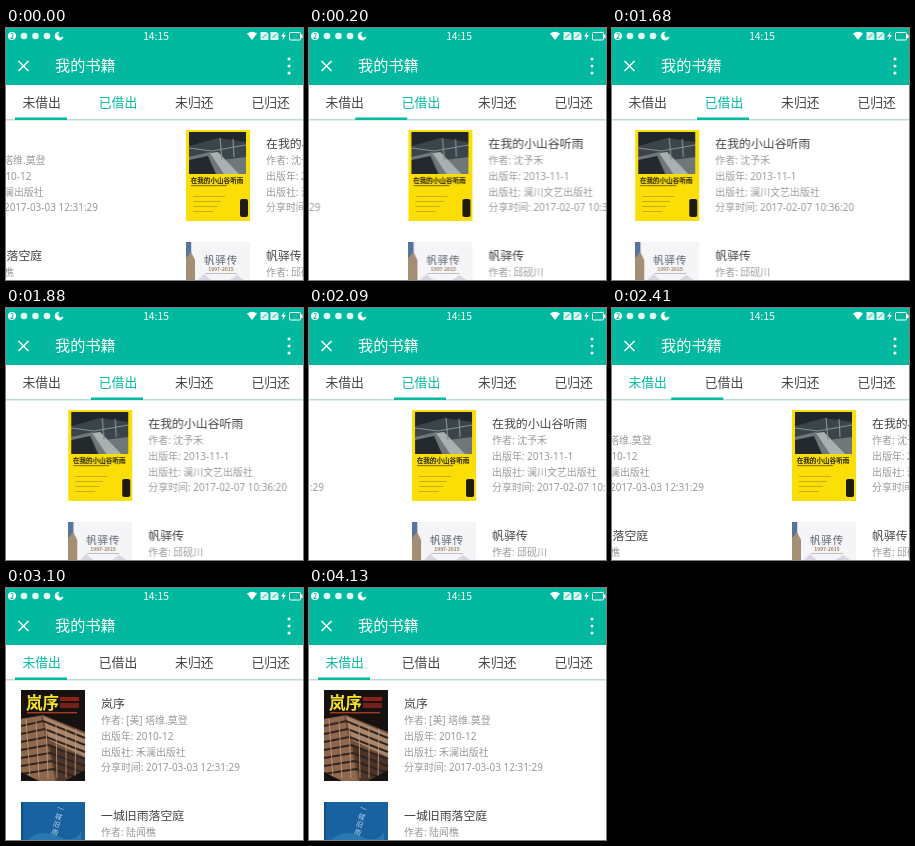
These frames come from a looping animation (297x252 px, 4290 ms). An HTML page:

```html
<!DOCTYPE html>
<html lang="zh-CN">
<head>
<meta charset="utf-8">
<title>我的书籍</title>
<style>
  html, body { margin: 0; width: 100%; height: 100%; overflow: hidden; background: #fff; }
  svg { display: block; width: 297px; height: 252px; }
  text { font-family: "Noto Sans CJK SC", "Noto Sans CJK", "Noto Sans", sans-serif; white-space: pre; }
  .mid { text-anchor: middle; }
  .tab { font-size: 12.8px; fill: #444; }
  .name { font-size: 11.9px; fill: #444; }
  .info { font: 9.95px "Noto Sans", "Noto Sans CJK SC", "Noto Sans CJK", sans-serif; fill: #999; }
</style>
</head>
<body>
<svg id="stage" viewBox="0 0 297 252"></svg>
<script>
const LOOP = 4290, PITCH = 307, FIRST = 32, SELECT = 2270;
const TEAL = '#02b99f', DARK = '#444';
const SETTLE = 'cubic-bezier(.35,0,.25,1)';

const rect = (x, y, w, h, fill, more = '') =>
  `<rect x="${x}" y="${y}" width="${w}" height="${h}" fill="${fill}" ${more}/>`;
const dot = (x, y, r, fill) => `<circle cx="${x}" cy="${y}" r="${r}" fill="${fill}"/>`;
const path = (d, fill, stroke = 'none', width = 1) =>
  `<path d="${d}" fill="${fill}" stroke="${stroke}" stroke-width="${width}"/>`;
const label = (x, y, s, attrs) => `<text x="${x}" y="${y}" ${attrs}>${s}</text>`;
const repeat = (n, fn) => Array.from({ length: n }, (_, i) => fn(i)).join('');

// Covers are 64 x 91, drawn from their own top left corner.
const covers = {
  valley: () =>
    rect(0, 0, 64, 91, '#fade05') +
    rect(3, 2, 57, 42, '#3b444a') +
    path('M3 2H60V12L32 8 3 16Z', '#20262b') +
    path('M3 27L24 22 36 30 60 27V44H3Z', '#6f7879') +
    path('M3 30L22 26 30 44H3Z', '#23292c') +
    path('M24 23L32 22 53 44H38Z', '#a9b0b0') +
    path('M3 18L26 21 60 15M34 8L36 30M47 9L48 27', 'none', '#848f95', 1.2) +
    label(31, 52.5, '在我的小山谷听雨', 'class="mid" font-size="6.6" font-weight="700" fill="#26220a"') +
    rect(5, 55, 36, 1.2, '#8d7c13') +
    repeat(4, i => rect(7, 66 + i * 5, 32 - i * 4, 1, '#c5ae10')) +
    rect(54, 69, 8, 18, '#1d1b12', 'rx="2"'),

  order: () =>
    rect(0, 0, 64, 91, '#17110f') +
    label(5, 19, '岚序', 'font-size="16.5" font-weight="700" fill="#f4e32a"') +
    rect(39, 7, 19, 4, '#8c2118') + rect(39, 13, 19, 5, '#74201a') +
    rect(6, 22, 50, 1.4, '#a83a25') +
    path('M0 29L22 25 64 42V91H0Z', '#6f4f3c') +
    path('M0 29L20 26 34 91H0Z', '#8d684e') +
    path('M22 26L64 44V67L28 50Z', '#a9866b') +
    path('M28 54L64 70V91H36Z', '#4b3429') +
    repeat(7, i => path(`M0 ${36 + i * 8}L${22 + i * 1.7} ${31 + i * 8}L64 ${48 + i * 7}`, 'none', '#33231c', 2)) +
    repeat(6, i => path(`M${5 + i * 10} ${29 + i * 2}L${9 + i * 9} 88`, 'none', '#c2a083', .8)) +
    path('M0 82L18 91H0ZM44 91L64 80V91Z', '#171312'),

  rain: () =>
    rect(0, 0, 64, 91, '#17629f') +
    rect(0, 0, 2, 91, '#114f86') +
    '<g transform="rotate(24 40 14)">' +
    repeat(4, i => label(33 + i * 1.5, 10 + i * 8, '一城旧雨'[i], 'font-size="7" fill="#bcd8ea"')) +
    '</g>' +
    path('M5 40Q18 26 36 34T60 30V42H5Z', '#2a78b2'),

  post: () =>
    rect(0, 0, 64, 91, '#f5f4f7') +
    rect(0, 0, 5, 91, '#5674a0') + rect(5, 0, 1, 91, '#d5d8e0') +
    path('M0 16L5 10 9 18V91H0Z', '#a58f74') +
    label(35, 22, '帆驿传', 'class="mid" font-size="10.5" letter-spacing=".8" font-weight="500" fill="#59606f"') +
    label(35, 28.5, '1997-2015', 'class="mid" font-size="5" font-weight="700" fill="#9a8263"') +
    rect(19, 31, 32, .8, '#b5b1b4') +
    path('M12 38L18 32 25 38ZM44 38L51 33 58 38Z', '#d9d5e2')
};

const book = (i, { cover, name, info }) => {
  const y = i * 112;
  return `<g transform="translate(15 ${102 + y})">${covers[cover]()}</g>` +
    label(95, 119.6 + y, name, 'class="name"') +
    info.map((s, k) => label(95, 136 + y + k * 15.8, s, 'class="info"')).join('');
};

const pages = [
  [
    { cover: 'order', name: '岚序',
      info: ['作者: [美] 塔维.莫登', '出版年: 2010-12', '出版社: 禾澜出版社', '分享时间: 2017-03-03 12:31:29'] },
    { cover: 'rain', name: '一城旧雨落空庭', info: ['作者: 陆闻樵'] }
  ],
  [
    { cover: 'valley', name: '在我的小山谷听雨',
      info: ['作者: 沈予禾', '出版年: 2013-11-1', '出版社: 澜川文艺出版社', '分享时间: 2017-02-07 10:36:20'] },
    { cover: 'post', name: '帆驿传', info: ['作者: 邱砚川'] }
  ]
];

const statusBar =
  dot(6, 8, 4, '#fff') + label(6, 10.6, '2', `class="mid" font-size="7" font-weight="700" fill="${TEAL}"`) +
  [18, 29.5, 41].map(x => dot(x, 8, 3.3, '#e0f8f3')).join('') +
  path('M53 4A4 4 0 1 0 57 9A3 3 0 0 1 53 4Z', '#fff', '#e0f8f3') +
  label(150, 12, '14:15', 'class="mid" font-size="10.3" fill="#fff"') +
  path('M241 5.5Q246 2 251 5.5L246 12Z', '#fff') +
  [254.5, 264.5].map(x =>
    path(`M${x} 4H${x + 6}L${x + 8} 6V12H${x}Z`, '#d9f5f0') +
    path(`M${x + 2} 10L${x + 6} 6`, 'none', TEAL)).join('') +
  path('M279 3L275 8.5H277.5L276 13 280 7H277.5Z', '#fff') +
  rect(283.5, 4.5, 11, 7.5, 'none', 'rx="1" stroke="#fff"') +
  rect(295, 6.5, 1.5, 3.5, '#fff');

const header =
  rect(0, 0, 297, 57, TEAL) + statusBar +
  path('M12.5 33L22.5 43M22.5 33L12.5 43', 'none', '#fff', 1.5) +
  rect(37, 28, 1, 20, '#1fab96') +
  label(49, 43.4, '我的书籍', 'font-size="15.2" fill="#fff"') +
  [31, 38, 45].map(y => dot(283, y, 1.5, '#fff')).join('');

const tabs =
  rect(0, 56, 297, 36, '#fff') + rect(0, 91, 297, 1.5, '#b9dcd7') +
  ['未借出', '已借出', '未归还', '已归还']
    .map((s, i) => label(35.7 + i * 76.3, 79, s, `class="tab mid" id="tab${i}"`)).join('') +
  rect(0, 89.5, 52, 2.5, TEAL, 'id="bar"');

const $ = id => document.getElementById(id);
$('stage').innerHTML =
  rect(0, 0, 297, 252, '#fff') +
  '<g id="pager">' + pages.map((list, p) =>
    `<g transform="translate(${(p - 1) * PITCH} 0)">${list.map((b, i) => book(i, b)).join('')}</g>`).join('') + '</g>' +
  tabs + header;

// Steps are [ms, value, easing to the next step].
const start = document.timeline.currentTime || 0;
const run = (id, steps, frame) => {
  const anim = $(id).animate(
    steps.map(([ms, v, easing = 'linear']) => ({ offset: ms / LOOP, easing, ...frame(v) })),
    { duration: LOOP, iterations: Infinity });
  anim.startTime = start;
};
const slide = x => ({ transform: `translateX(${x}px)` });
const paint = fill => ({ fill });

run('pager', [
  [0, 165], [FIRST, 165, SETTLE], [FIRST + 490, 0], [1680, 0],
  [1680, 8], [2090, 88], [2200, 92],
  [SELECT, 92, SETTLE], [SELECT + 500, PITCH], [LOOP, PITCH]
], slide);
run('bar', [
  [0, 9], [FIRST, 9, SETTLE], [FIRST + 490, 85],
  [SELECT, 85, SETTLE], [SELECT + 500, 9], [LOOP, 9]
], slide);
run('tab0', [[0, DARK], [SELECT, DARK], [SELECT, TEAL], [LOOP, TEAL]], paint);
run('tab1', [[0, TEAL], [SELECT, TEAL], [SELECT, DARK], [LOOP, DARK]], paint);
</script>
</body>
</html>
```
